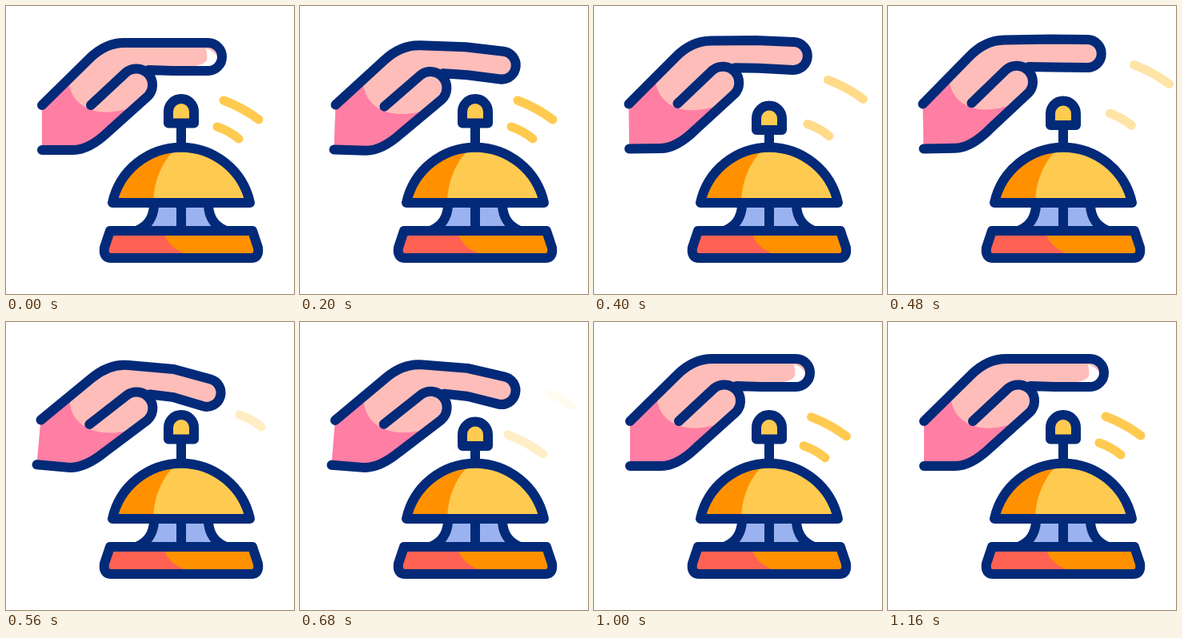
Recreate the animation shown at these times as an HTML page. Size 360 by 360 pixels, loop 1.48 s.

```html
<!DOCTYPE html>
<html lang="en">
<head>
<meta charset="utf-8">
<title>Service bell</title>
<style>
  html, body { margin: 0; width: 100%; height: 100%; overflow: hidden; background: #fff; }
  svg { display: block; width: 100vw; height: 100vh; }
  .ink { fill: none; stroke: #022a78; stroke-width: 12; stroke-linecap: round; stroke-linejoin: round; }
  .wave { fill: none; stroke: #ffca50; stroke-width: 11; stroke-linecap: round; }
</style>
</head>
<body>
<svg viewBox="0 0 360 360">
  <defs>
    <path id="dome" d="M133 246A88 88 0 0 1 305 246Z"/>
    <path id="base" d="M130 281H308L315 302Q317 315 306 315H132Q121 315 123 302Z"/>
    <clipPath id="domeClip"><use href="#dome"/></clipPath>
    <clipPath id="baseClip"><use href="#base"/></clipPath>
  </defs>

  <path id="wave1" class="wave" d="M272 118Q296 127 316 142"/>
  <path id="wave2" class="wave" d="M264 151Q279 156 291 166"/>

  <g id="knob" class="ink">
    <path d="M219 150V180"/>
    <path fill="#ffca50" d="M203 146.5V132A16 16 0 0 1 235 132V146.5Z"/>
  </g>

  <path fill="#9bb2f0" d="M186 250C186 265 177 277 165 280H273C261 277 252 265 252 250Z"/>
  <path class="ink" d="M185 250C184 264 177 275 165 280M253 250C254 264 261 275 273 280M219 250V280"/>

  <g clip-path="url(#domeClip)">
    <path fill="#ffca50" d="M120 170H320V250H120Z"/>
    <path fill="#ff9100" d="M120 170H222C200 186 184 212 184 250H120Z"/>
  </g>
  <use href="#dome" class="ink"/>

  <g clip-path="url(#baseClip)">
    <path fill="#ff9100" d="M110 278H325V320H110Z"/>
    <path fill="#ff6153" d="M110 278H196C199 295 209 305 228 311V320H110Z"/>
  </g>
  <use href="#base" class="ink"/>

  <g id="hand">
    <path id="skin" fill="#ffbdb9"/>
    <path id="shade" fill="#ff7ea4"/>
    <path id="shine" fill="#fff" d="M250 53C257 55 264 60 264 66C264 72 259 76 252 76H228C240 75 247 73 251 68C252 63 251 58 250 53Z"/>
    <path id="lines" class="ink"/>
  </g>
</svg>
<script>
const LOOP = 1480, STEP = 40;
const $ = id => document.getElementById(id);
const set = (id, name, value) => $(id).setAttribute(name, value);

// Progress from 0 to 1, even or eased
const linear = (t, from, span) => Math.min(1, Math.max(0, (t - from) / span));
function ramp(t, from, span) {
  const u = linear(t, from, span);
  return u * u * (3 - 2 * u);
}

const THUMB_TIP = 'A20.2 20.2 0 0 1 177 113';
const PALM = 'L128 157Q104 180 84 180H45';
set('shade', 'd', `M45 124L78 91C80 126 112 142 157 127${PALM}Z`);

// Turns a point of the finger about its joint
function bendPoint(x, y, degrees) {
  const a = degrees * Math.PI / 180, dx = x - 205, dy = y - 46;
  return [205 + dx * Math.cos(a) - dy * Math.sin(a), 46 + dx * Math.sin(a) + dy * Math.cos(a)];
}

function drawHand(t) {
  const tap1 = ramp(t, 130, 180), lift1 = ramp(t, 310, 130);
  const tap2 = ramp(t, 440, 160), lift2 = ramp(t, 600, 220);
  const turn = 6 * tap1 - 8.5 * lift1 + 9 * tap2 - 6.5 * lift2;
  const bend = 14 * (tap1 - lift1) + 12 * (tap2 - lift2);
  const shift = -1.5 * (tap1 - lift2);

  const finger = `M45 124L104 66Q124 46 148 46H205L${bendPoint(252.5, 46, bend)}`
    + `A17.5 17.5 0 0 1 ${bendPoint(252.5, 81, bend)}L208 81L178 80`;
  set('skin', 'd', `${finger}${THUMB_TIP}${PALM}Z`);
  set('lines', 'd', `${finger}M106 124L150 83${THUMB_TIP}${PALM}`);
  set('hand', 'transform', `translate(${shift} ${shift}) rotate(${turn} 45 124)`);
  set('shine', 'visibility', turn === 0 ? 'visible' : 'hidden');
}

function drawKnob(t) {
  const press = ramp(t, 230, 80) - ramp(t, 410, 110) + ramp(t, 560, 80) - ramp(t, 690, 110);
  set('knob', 'transform', `translate(0 ${8.5 * press})`);
}

// A wave flies up and fades, then rises back into place from below
function drawWave(id, t, leave, swap, enter) {
  const away = ramp(t, leave, 440), left = 1 - ramp(t, enter, 550);
  const [x, y, alpha] = t < swap
    ? [56 * away, -70 * away, 1 - linear(t, 240, 480)]
    : [-16 * left, 30 * left, linear(t, 560, 370)];
  set(id, 'transform', `translate(${x} ${y})`);
  set(id, 'opacity', alpha);
}

function draw(t) {
  drawHand(t);
  drawKnob(t);
  drawWave('wave1', t, 220, 540, 505);
  drawWave('wave2', t, 340, 700, 570);
}

const start = performance.now();
function tick() {
  const t = (performance.now() - start) % LOOP;
  draw(Math.floor(t / STEP) * STEP);
  requestAnimationFrame(tick);
}
tick();
</script>
</body>
</html>
```
